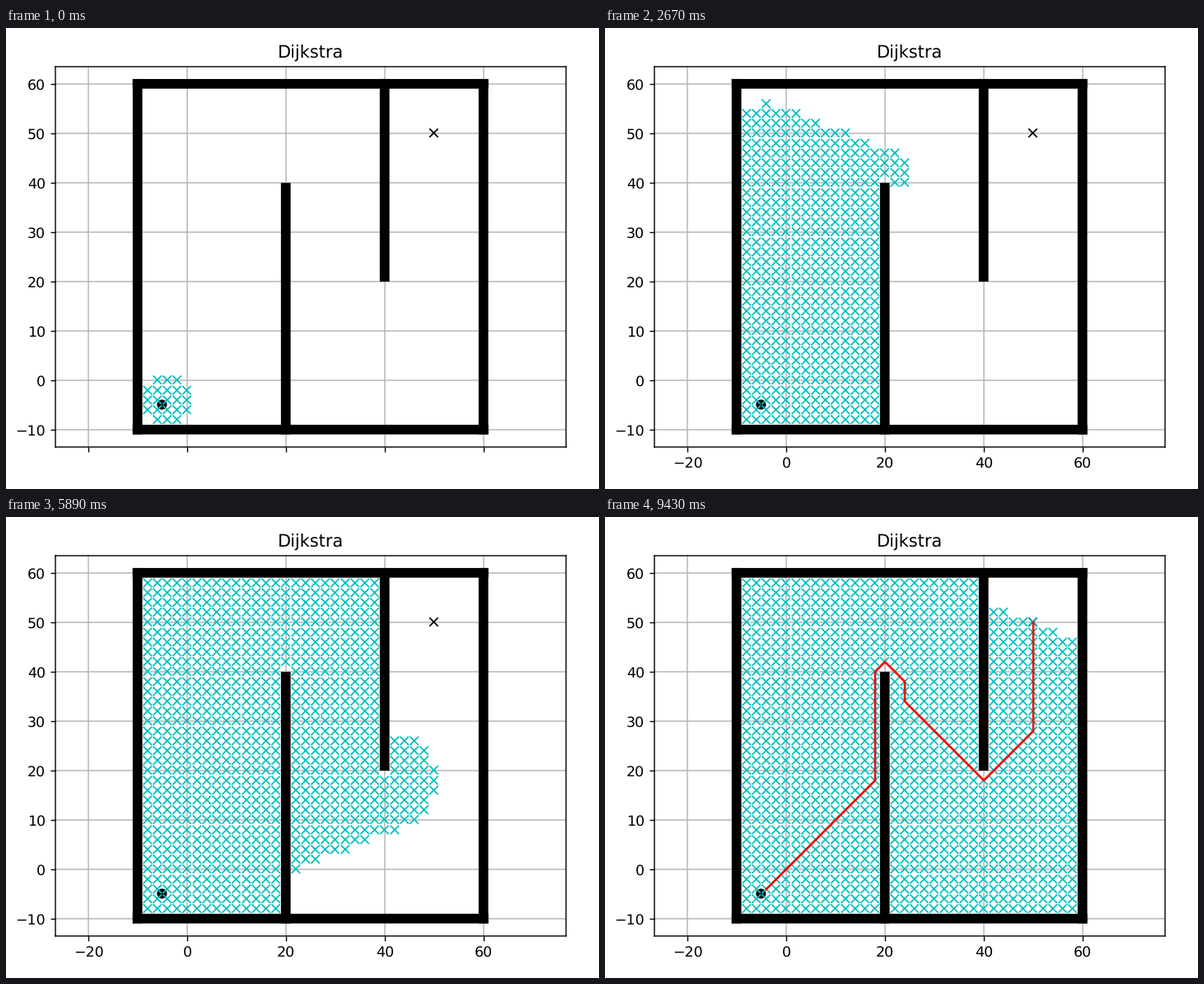
Write a matplotlib script that moves like this. It is 720 by 560 pixels and loops after 9960 ms.

```python
import math

import matplotlib.pyplot as plt
import numpy as np
from matplotlib.animation import FuncAnimation

WIDTH, HEIGHT, DPI = 720, 560, 125
LOOP_MS, INTERVAL_MS = 9960, 30
UNIT = 6           # pixels per data unit
FINE_UNIT = 9.6    # the same on the finer grid that markers are placed on
POINT = DPI / 72 / UNIT  # one typographic point in data units

STEP = 2
START, GOAL = (-4, -4), (50, 50)
PATH = [START, (18, 18), (18, 40), (20, 42), (24, 38), (24, 34),
        (40, 18), (50, 28), GOAL]
LABELS_MS, PATH_MS = 70, 9430

# Ten nodes per redraw; each redraw takes longer as the plot fills up
FIRST_COUNT, BATCH = 21, 10
REDRAW_MS, SLOWDOWN_MS = 45, 0.418


def is_free(x, y):
    inside = -10 < x < 60 and -10 < y < 60
    return inside and not (x == 20 and y <= 40) and not (x == 40 and y >= 20)


def search_order():
    """Nodes in the order in which Dijkstra's algorithm settles them."""
    straight = [(1, 0), (0, 1), (-1, 0), (0, -1)]
    diagonal = [(-1, -1), (-1, 1), (1, -1), (1, 1)]
    frontier, closed = {START: 0.0}, {}
    while True:
        node = min(frontier, key=frontier.get)
        cost = closed[node] = frontier.pop(node)
        if node == GOAL:
            return list(closed)
        for dx, dy in straight + diagonal:
            near = (node[0] + STEP * dx, node[1] + STEP * dy)
            if near in closed or not is_free(*near):
                continue
            new_cost = cost + math.hypot(dx, dy)
            frontier[near] = min(frontier.get(near, math.inf), new_cost)


def snap(points):
    """Round marker positions down to whole steps of the finer grid."""
    x, y = np.array(points, float).T
    fine_x = np.floor(FINE_UNIT * x - 1e-6)
    fine_y = np.floor(0.8 - FINE_UNIT * y + 1e-6) - 0.8
    return np.column_stack([fine_x, -fine_y]) / FINE_UNIT


def cross_lines(points):
    """Two diagonals per point, separated by gaps."""
    arm = 3 * POINT
    gap = (np.nan, np.nan)
    shape = np.array([(-arm, -arm), (arm, arm), gap,
                      (-arm, arm), (arm, -arm), gap])
    return snap(points)[:, None, :] + shape


def add_wall(*ends):
    """A run of overlapping square markers, drawn as one bar."""
    half = 9.39 / FINE_UNIT
    shift = 0.5 / FINE_UNIT
    low, high = snap(ends) + (shift, -shift)
    size = high - low + 2 * half
    ax.add_patch(plt.Rectangle(low - half, *size, color="k", lw=0, zorder=2))


def redraws(now):
    """Solve REDRAW_MS * n + SLOWDOWN_MS * n**2 = now for whole n."""
    root = math.sqrt(REDRAW_MS ** 2 + 4 * SLOWDOWN_MS * now)
    return int((root - REDRAW_MS) / (2 * SLOWDOWN_MS))


plt.rcParams.update({"font.family": "DejaVu Sans", "text.hinting": "none",
                     "path.snap": False, "path.simplify": False})
fig = plt.figure(figsize=(WIDTH / DPI, HEIGHT / DPI), dpi=DPI)
ax = fig.add_axes([60 / WIDTH, 51 / HEIGHT, 620 / WIDTH, 462 / HEIGHT])
ax.set_xlim(25 - 310 / UNIT, 25 + 310 / UNIT)
ax.set_ylim(25 - 231 / UNIT, 25 + 231 / UNIT)
ax.set_xticks(range(-20, 61, 20))
ax.set_yticks(range(-10, 61, 10))
ax.grid(True)
ax.set_title("Dijkstra")

for side in (-10, 60):
    add_wall((-10, side), (60, side))
    add_wall((side, -10), (side, 60))
add_wall((20, -10), (20, 39))
add_wall((40, 21), (40, 60))

start_spot = snap([(-5, -5)])[0]
ax.add_patch(plt.Circle(start_spot, 3.5 * POINT, color="k", lw=0, zorder=2))
cross_style = {"lw": 1, "solid_capstyle": "butt"}
ax.plot(*cross_lines([GOAL]).reshape(-1, 2).T, "k", **cross_style)
crosses, = ax.plot([], [], "c", **cross_style)
route, = ax.plot(*zip(*PATH), "r")
visited = cross_lines(search_order())


def draw(frame):
    now = (frame + 0.5) * INTERVAL_MS
    count = FIRST_COUNT + BATCH * redraws(now)
    crosses.set_data(*visited[:count].reshape(-1, 2).T)
    route.set_visible(now >= PATH_MS)
    ax.tick_params(axis="x", labelbottom=now >= LABELS_MS)
    return crosses, route


animation = FuncAnimation(fig, draw, frames=LOOP_MS // INTERVAL_MS,
                          interval=INTERVAL_MS, repeat=True, repeat_delay=0)
plt.show()
```
